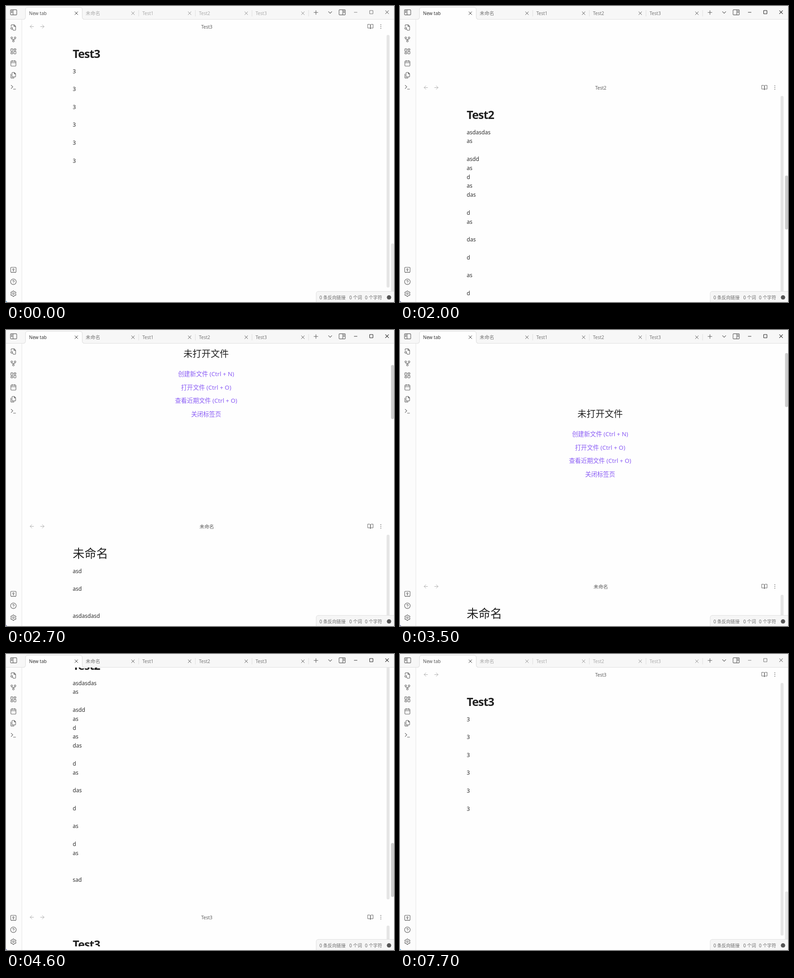
Write an HTML page that moves like this. It is 855 px wide and 655 px high and loops after 7900 ms.

```html
<!DOCTYPE html>
<html lang="zh-CN">
<head>
<meta charset="utf-8">
<title>Stacked notes</title>
<style>
  html, body { margin: 0; width: 100%; height: 100%; overflow: hidden; background: #fefefe; }
  svg { display: block; }
  text { font: 10px "Noto Sans", "Noto Sans CJK SC", sans-serif; fill: #5c5c5c; }
  .cjk { font-size: 10.7px; }
  .mid { text-anchor: middle; }
  .body { font-size: 12.1px; fill: #2b2b2b; }
  .h1 { font-size: 25px; font-weight: 700; letter-spacing: -.04em; fill: #222; }
  .h1.cjk { font-size: 26px; font-weight: 500; letter-spacing: 0; }
  .empty { font-size: 20px; font-weight: 500; fill: #222; }
  .link { font-size: 13.2px; fill: #8a5cf5; }
  .status { font-size: 9.9px; fill: #6a6a6a; }
  .icon { fill: none; stroke-linecap: round; stroke-linejoin: round; }
  .bar { fill: #e5e5e5; }
  #app { --tab: #ababab; --close: #8a8a8a; --win: #777; --active: #555; --corner: #0a7fd0; }
  #app.focused { --tab: #767676; --close: #505050; --win: #222; --active: #333; --corner: #5557a0; }
</style>
</head>
<body>
<svg id="app" width="855" height="655" viewBox="0 0 855 655">
  <defs><clipPath id="view"><rect x="35" y="30" width="820" height="617"/></clipPath></defs>
  <rect width="855" height="655" fill="#fefefe"/>
  <g clip-path="url(#view)"><g id="leaves"></g></g>
  <rect id="thumb" class="bar" x="848.5" width="6.5" height="119.4" rx="3"/>
  <g id="chrome"></g>
</svg>
<script>
const app = document.getElementById('app');
const leaves = document.getElementById('leaves');
const thumb = document.getElementById('thumb');
const LEAF = 617, LOOP = 7900, LINE = 19.8;

const ring = (x, y, r) => `M${x - r} ${y}a${r} ${r} 0 1 0 ${2 * r} 0a${r} ${r} 0 1 0 ${-2 * r} 0`;
const box = (x, y, w, h, r = 1) =>
  `M${x + r} ${y}h${w - 2 * r}q${r} 0 ${r} ${r}v${h - 2 * r}q0 ${r} ${-r} ${r}h${2 * r - w}q${-r} 0 ${-r} ${-r}v${2 * r - h}q0 ${-r} ${r} ${-r}z`;

function gear() {
  const points = [];
  for (let k = 0; k < 6; k++)
    for (const [r, turn] of [[10, -11], [10, 11], [7.8, 19], [7.8, 41]]) {
      const a = (60 * k + turn - 90) * Math.PI / 180;
      points.push(`${(12 + r * Math.cos(a)).toFixed(2)} ${(12 + r * Math.sin(a)).toFixed(2)}`);
    }
  return `M${points.join('L')}z`;
}

// Icon outlines on a 24 unit grid
const shapes = {
  search: 'M4 8V4q0-2 2-2h8.5L20 7.5V20q0 2-2 2h-7M14 2v6h6M8.5 17.5L11 20' + ring(6, 14.5, 3.2),
  fork: ring(12, 18, 3) + ring(6, 6, 3) + ring(18, 6, 3) + 'M18 9v1q0 2-2 2H8q-2 0-2-2V9M12 12v3',
  grid: box(3, 3, 7, 9) + box(14, 3, 7, 5) + box(14, 12, 7, 9) + box(3, 16, 7, 5),
  calendar: box(3, 4, 18, 18, 2) + 'M16 2v4M8 2v4M3 10h18',
  files: 'M15.5 2H9Q7 2 7 4v12q0 2 2 2h9q2 0 2-2V6.5zM15 2v5h5M3 7.6v12.8Q3 22 4.6 22h9.8',
  prompt: 'M4 17l6-6-6-6M12 19h8',
  vault: box(2.5, 3, 19, 18, 2) + ring(12, 10.5, 2.5) + 'M12 13v4M5 21v1M19 21v1',
  help: ring(12, 12, 10) + 'M9.1 9a3 3 0 0 1 5.8 1c0 2-3 3-3 3M12 17h.01',
  gear: gear() + ring(12, 12, 3),
  left: 'M19 12H5M12 19l-7-7 7-7',
  right: 'M5 12h14M12 5l7 7-7 7',
  book: 'M2 3h6a4 4 0 0 1 4 4v14a3 3 0 0 0-3-3H2zM22 3h-6a4 4 0 0 0-4 4v14a3 3 0 0 1 3-3h7z',
  dots: ring(12, 12, 1) + ring(12, 5, 1) + ring(12, 19, 1),
  plus: 'M12 5v14M5 12h14',
  down: 'M6 9l6 6 6-6',
  cross: 'M18 6L6 18M6 6l12 12',
  minus: 'M6 12h12',
  square: box(6, 6, 12, 12),
  panel: box(1, 3, 22, 18, 2) + 'M10 4v16M4 7h3M4 10h3M4 13h3',
  panelRight: box(1, 3, 22, 18, 2) + 'M14 4v16M17 7h3M17 10h3M17 13h3'
};

const icon = (name, x, y, size = 14.8, color = '#5c5c5c', weight = 1.75) =>
  `<path class="icon" d="${shapes[name]}" style="stroke:${color}" stroke-width="${weight}"
    transform="translate(${x - size / 2} ${y - size / 2}) scale(${size / 24})"/>`;
const label = (text, x, y, cls = '', color = '') =>
  `<text x="${x}" y="${y}" class="${cls}"${color && ` style="fill:${color}"`}>${text}</text>`;
const script = text => /[a-z]/i.test(text) ? '' : 'cjk';

const every = (char, count) => Array(count).fill(char).join('//');
const notes = [
  { title: 'New tab' },
  { title: '未命名', text: 'asd//asd///asdasdasd//asdasda//asdasdas', bar: true },
  { title: 'Test1', text: every('1', 6) },
  { title: 'Test2', text: 'asdasdas/as//asdd/as/d/as/das//d/as//das//d//as//d/as///sad', bar: true },
  { title: 'Test3', text: every('3', 6), bar: true }
];

function emptyView() {
  const links = ['创建新文件 (Ctrl + N)', '打开文件 (Ctrl + O)', '查看近期文件 (Ctrl + O)', '关闭标签页'];
  return label('未打开文件', 441, 258, 'empty mid') +
    links.map((link, i) => label(link, 441, 300 + 29.7 * i, 'link mid')).join('');
}

function noteView({ title, text, bar }) {
  const x = bar ? 147 : 152;
  const lines = text.split('/').map((line, i) =>
    line && label(line, x, 118.6 + LINE * i, 'body')).join('');
  return icon('book', 803, 15.5, 13.2) + label(title, x, 85, 'h1 ' + script(title)) + lines +
    (bar ? '<rect class="bar inner" x="838.7" y="34" width="6.5" height="559" rx="3"/>' : '');
}

leaves.innerHTML = notes.map((note, i) =>
  `<g transform="translate(0 ${LEAF * i})">` +
  icon('left', 57, 15.5, 13.2, '#ababab') + icon('right', 80, 15.5, 13.2, '#ababab') +
  label(note.title, 442.5, 20, 'mid ' + script(note.title)) + icon('dots', 826, 15.5, 13.2) +
  (note.text ? noteView(note) : emptyView()) + '</g>').join('');

function chrome() {
  const tabs = notes.map(({ title }, i) => {
    const x = 124.8 * i;
    return label(title, 50.8 + x, 19.8, script(title), i ? 'var(--tab)' : 'var(--active)') +
      icon('cross', 155 + x, 16, 13.2, i ? 'var(--close)' : '#333') +
      (i ? `<path d="M${167.7 + x} 9v14" stroke="#dedede"/>` : '');
  }).join('');
  const ribbon = ['search', 'fork', 'grid', 'calendar', 'files', 'prompt']
    .map((name, i) => icon(name, 16.3, 47.6 + 26.4 * i)).join('');
  const tools = ['vault', 'help', 'gear'].map((name, i) => icon(name, 16.3, 583.8 + 26.4 * i)).join('');
  return `<rect y="30" width="35" height="625" fill="#fcfcfc"/>
    <path d="M35 30v625" stroke="#e4e4e4"/>
    <rect width="855" height="29.5" fill="#f7f7f7"/>
    <path d="M0 29.5H38q5 0 5-5V8q0-5 5-5h115q5 0 5 5v16.5q0 5 5 5h682" fill="none" stroke="#e0e0e0"/>
    <path d="M38 30q5 0 5-5V8q0-5 5-5h115q5 0 5 5v17q0 5 5 5z" fill="#fefefe"/>
    <path d="M38 29.5q5 0 5-5V8q0-5 5-5h115q5 0 5 5v16.5q0 5 5 5" fill="none" stroke="#e0e0e0"/>` +
    tabs + ribbon + tools + icon('panel', 16.8, 14, 15) +
    icon('plus', 683, 14.3, 15) + icon('down', 714.3, 14.3, 14.8) + icon('panelRight', 740.8, 14, 15) +
    icon('minus', 770.5, 14, 13, 'var(--win)') + icon('square', 805, 13.7, 14.5, 'var(--win)') +
    icon('cross', 839.7, 13.7, 14, 'var(--win)') +
    `<path d="M683.5 656V637q0-5.500 5.500-5.500H856V656z" fill="#f6f6f6" stroke="#e0e0e0"/>` +
    label('0 条反向链接', 690.7, 648.6, 'status') + label('0 个词', 756.5, 648.6, 'status') +
    label('0 个字符', 791, 648.6, 'status') +
    `<circle cx="844" cy="644.8" r="4.8" fill="#555"/>
    <path d="M0 651q0 4 4 4H0z" style="fill:var(--corner)"/>`;
}
document.getElementById('chrome').innerHTML = chrome();

const scrollKeys = [
  [1600, 2468], [1800, 2090], [2000, 1716], [2500, 610], [2700, 228], [2900, 0],
  [3400, 0], [3600, 190], [3900, 683], [4000, 898], [4100, 991], [4200, 1050],
  [4300, 1162], [4600, 1931], [4800, 2230], [5000, 2458], [5100, 2468]
];
const innerKeys = [[0, '#e5e5e5'], [200, '#dadada'], [300, '#d0d0d0'], [500, '#d6d6d6'],
  [600, '#dedede'], [700, '#e5e5e5'], [1000, '#dadada'], [1100, '#e5e5e5']];
const thumbKeys = [[0, '#e5e5e5'], [1100, '#dadada'], [1400, '#ccc'], [5200, '#dadada'], [5400, '#e5e5e5']];

const hold = (keys, t) => keys.filter(([at]) => at <= t).pop()[1];
function glide(keys, t) {
  const next = keys.findIndex(([at]) => at > t);
  if (next < 0) return keys[keys.length - 1][1];
  if (next === 0) return keys[0][1];
  const [t0, a] = keys[next - 1], [t1, b] = keys[next];
  return a + (b - a) * (t - t0) / (t1 - t0);
}

const innerBars = leaves.querySelectorAll('.inner');
const start = performance.now();
function draw() {
  // The picture advances ten times a second
  const t = Math.floor((performance.now() - start) % LOOP / 100) * 100;
  const scroll = glide(scrollKeys, t);
  leaves.setAttribute('transform', `translate(0 ${30 - Math.round(scroll)})`);
  thumb.setAttribute('y', 32 + scroll / 5);
  thumb.style.fill = hold(thumbKeys, t);
  for (const bar of innerBars) bar.style.fill = hold(innerKeys, t);
  app.classList.toggle('focused', t >= 1700 && t < 7700);
  requestAnimationFrame(draw);
}
draw();
</script>
</body>
</html>
```
